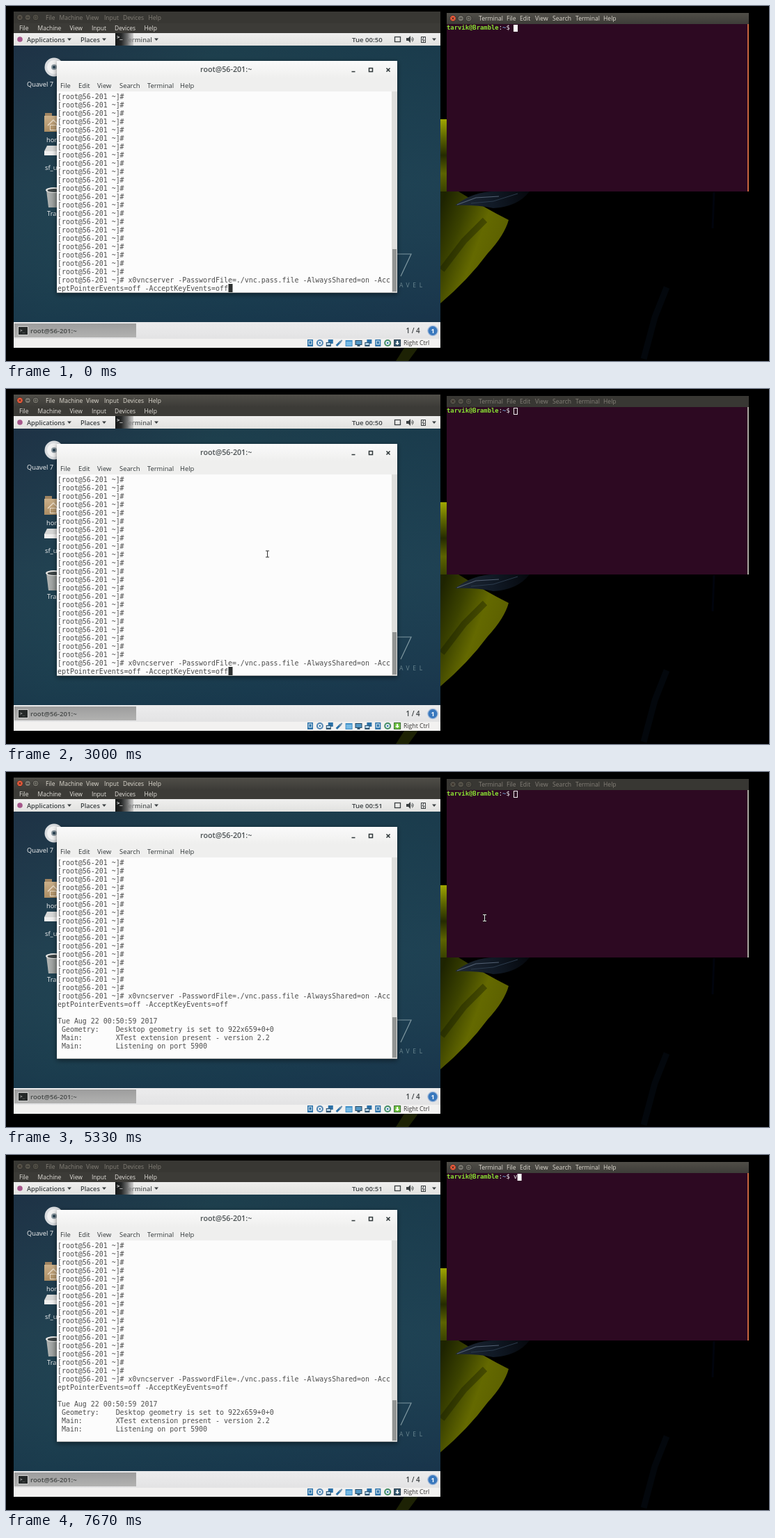
An HTML page with a canvas for the animation above (8000 ms loop, 1096 px wide and 511 px high).

```html
<!DOCTYPE html>
<html lang="en">
<head>
<meta charset="utf-8">
<title>Two terminals</title>
<style>
html, body { margin: 0; width: 100%; height: 100%; overflow: hidden; background: #000; }
canvas { display: block; }
</style>
</head>
<body>
<canvas id="stage" width="1096" height="511"></canvas>
<script>
const ctx = document.getElementById('stage').getContext('2d');
const LOOP = 8000, STEP = 1000 / 3;
const SANS = '"Open Sans", "Noto Sans", sans-serif';
const MONO = '"DejaVu Sans Mono", monospace';
const HOST = 'tarvik@Bramble';

function rect(x, y, w, h, fill) {
  ctx.fillStyle = fill;
  ctx.fillRect(x, y, w, h);
}
function frame(x, y, w, h, color, width = 1) {
  ctx.strokeStyle = color;
  ctx.lineWidth = width;
  ctx.strokeRect(x, y, w, h);
}
function circle(x, y, r, fill) {
  ctx.fillStyle = fill;
  ctx.beginPath();
  ctx.arc(x, y, r, 0, Math.PI * 2);
  ctx.fill();
}
function ring(x, y, r, color) {
  ctx.strokeStyle = color;
  ctx.lineWidth = 0.8;
  ctx.beginPath();
  ctx.arc(x, y, r, 0, Math.PI * 2);
  ctx.stroke();
}
function trace(points) {
  ctx.beginPath();
  points.forEach(([x, y], i) => i ? ctx.lineTo(x, y) : ctx.moveTo(x, y));
}
function poly(points, fill) {
  trace(points);
  ctx.fillStyle = fill;
  ctx.fill();
}
function line(points, color, width = 1) {
  trace(points);
  ctx.strokeStyle = color;
  ctx.lineWidth = width;
  ctx.stroke();
}
function text(str, x, y, size, color, family = SANS, weight = 400) {
  ctx.font = `${weight} ${size}px ${family}`;
  ctx.fillStyle = color;
  ctx.fillText(str, x, y);
}
function words(list, y, size, color) {
  for (const [str, x] of list) text(str, x, y, size, color);
}
function gradient(x0, y0, x1, y1, ...colors) {
  const g = ctx.createLinearGradient(x0, y0, x1, y1);
  colors.forEach((c, i) => g.addColorStop(i / (colors.length - 1), c));
  return g;
}
function triangle(x, y, color) {
  poly([[x - 3, y - 1.5], [x + 3, y - 1.5], [x, y + 2]], color);
}

function backdrop() {
  rect(0, 0, 1096, 511, '#000');
  // Leaf showing beside and below the right terminal
  rect(624, 163, 9, 104, gradient(0, 163, 0, 267, '#a0a600', '#5d6500', '#252b00', '#5d6400', '#3a4200'));
  ctx.fillStyle = gradient(624, 290, 720, 325, '#1e2400', '#3b4200', '#646900', '#5c6000');
  ctx.beginPath();
  ctx.moveTo(624, 267);
  ctx.lineTo(650, 267);
  ctx.quadraticCurveTo(690, 292, 722, 308);
  ctx.quadraticCurveTo(716, 330, 692, 356);
  ctx.quadraticCurveTo(664, 394, 624, 428);
  ctx.fill();
  line([[626, 380], [658, 338], [688, 308]], 'rgba(14,18,0,.35)', 9);
  poly([[560, 511], [572, 492], [592, 492], [578, 511]], '#1d2204');
  ctx.fillStyle = gradient(645, 290, 750, 267, '#202a36', '#111a26', '#05080d');
  ctx.beginPath();
  ctx.moveTo(645, 287);
  ctx.quadraticCurveTo(672, 266, 705, 267);
  ctx.lineTo(752, 267);
  ctx.quadraticCurveTo(735, 289, 700, 291);
  ctx.quadraticCurveTo(675, 286, 645, 287);
  ctx.fill();
  line([[648, 286], [675, 276], [708, 274]], '#536173', 1.2);
  line([[668, 284], [700, 281], [735, 270]], '#2c3b4c');
  line([[949, 405], [932, 448], [916, 508]], 'rgba(5,12,20,.6)', 9);
  line([[1017, 268], [1015, 320]], 'rgba(2,5,18,.7)', 3);
}

function hostButtons(x, y, active) {
  for (let i = 0; i < 3; i++) {
    const cx = x + i * 11.3;
    circle(cx, y, 4.3, i === 0 && active ? '#ec5b3b' : active ? '#77756d' : '#555249');
    ring(cx, y, 4.3, '#292825');
    if (i === 0) {
      line([[cx - 1.6, y - 1.6], [cx + 1.6, y + 1.6]], '#33251f');
      line([[cx + 1.6, y - 1.6], [cx - 1.6, y + 1.6]], '#33251f');
    } else if (i === 1) line([[cx - 2, y], [cx + 2, y]], '#33322e');
    else frame(cx - 1.7, y - 1.5, 3.4, 3, '#33322e', 0.8);
  }
}

function desktopIcons() {
  circle(69, 88, 13.5, '#d9dcdf');
  circle(69, 88, 10, '#f2f2f2');
  circle(69, 88, 4, '#8b98a0');
  circle(69, 88, 2, '#263f50');
  text('Quavel 7', 30, 115.5, 9.3, '#f4f4f4');

  rect(56, 154, 10, 6, '#a08460');
  rect(55, 158, 24, 23, gradient(0, 158, 0, 181, '#cbb08a', '#ab8d63'));
  line([[60, 172], [68, 164], [76, 172]], '#eadcc8', 1.5);
  frame(63.5, 171.5, 9, 7, '#eadcc8');
  text('home', 58, 195.5, 9.3, '#f4f4f4');

  poly([[59, 201], [80, 201], [80, 215], [56, 215], [55, 209]], '#d7d8d7');
  rect(55, 209, 24, 6, '#f0f0ef');
  text('sf_u', 56, 235.5, 9.3, '#f4f4f4');

  poly([[58, 265], [80, 265], [78, 290], [61, 290]], gradient(58, 0, 80, 0, '#b5b8b6', '#777d7b'));
  ctx.fillStyle = '#e6e6e4';
  ctx.beginPath();
  ctx.ellipse(69, 265, 12, 4, 0, 0, Math.PI * 2);
  ctx.fill();
  ctx.fillStyle = '#3c4445';
  ctx.beginPath();
  ctx.ellipse(69, 265.5, 9.5, 2.5, 0, 0, Math.PI * 2);
  ctx.fill();
  text('Trash', 59, 302, 9.3, '#f4f4f4');
}

function topPanel(minute) {
  rect(11, 39, 613, 18, gradient(0, 39, 0, 57, '#efefee', '#e2e2e0'));
  const ink = '#3a3f41';
  circle(20, 48, 3.8, '#a5568a');
  text('Applications', 30, 51.7, 9.2, ink, SANS, 600);
  triangle(91, 48, ink);
  text('Places', 107, 51.7, 9.2, ink, SANS, 600);
  triangle(141, 48, ink);
  text('Terminal', 171, 51.7, 9.2, '#55595a', SANS, 600);
  triangle(216, 48, ink);
  rect(157, 39, 26, 18, gradient(157, 0, 183, 0, '#151818', '#262828', '#6d6e6e', 'rgba(170,170,170,.5)'));
  text('>_', 159, 47, 7, '#f0f0f0', MONO, 700);
  text('Tue 00:' + minute, 497, 51.7, 9.6, ink, SANS, 600);
  frame(558.5, 44.5, 8, 7, ink, 1.3);
  poly([[575, 46], [578, 46], [581, 43], [581, 53], [578, 50], [575, 50]], ink);
  for (const r of [2, 4]) {
    ctx.beginPath();
    ctx.arc(581, 48, r, -1, 1);
    ctx.strokeStyle = ink;
    ctx.lineWidth = 1;
    ctx.stroke();
  }
  frame(596.5, 44.5, 6, 8, ink);
  line([[600, 45], [598, 49], [601, 49], [599, 52]], ink);
  triangle(615, 48, ink);
}

function bottomPanel(active) {
  rect(11, 455, 613, 24, gradient(0, 455, 0, 479, '#ececed', '#e3e3e4'));
  rect(12, 457, 175, 20, gradient(0, 457, 0, 477, '#9d9d9d', '#b2b2b1'));
  rect(17, 461, 15, 13, '#d1d1d0');
  rect(18, 462, 13, 11, '#242828');
  text('>_', 20, 469, 6, '#ddd', MONO);
  text('root@56-201:~', 35, 471, 9.6, '#444746', SANS, 600);
  text('1 / 4', 574.5, 471, 9.8, '#3a3f41', SANS, 600);
  circle(613, 467.5, 7.8, '#a7bddb');
  circle(613, 467.5, 6.5, '#3978bd');
  text('1', 610.5, 471, 9, '#fff', SANS, 700);

  rect(11, 479, 613, 13, '#f2f1f0');
  const blue = '#2b71a8';
  for (let i = 0; i < 10; i++) {
    const x = 437 + i * 13.9, y = 485;
    if (i === 1 || i === 8) {
      circle(x, y, 5, i === 1 ? '#5487b4' : '#438d64');
      circle(x, y, 3, '#e4edf4');
      circle(x, y, 1.2, blue);
    } else if (i === 3) {
      line([[x - 4, y + 4], [x + 2, y - 2]], blue, 3);
      line([[x, y], [x + 4, y - 4]], '#6a8fac', 2);
    } else if (i === 2 || i === 6) {
      rect(x - 2, y - 5, 7, 6, blue);
      rect(x - 5, y - 1, 7, 6, '#274c69');
      rect(x - 4, y, 5, 3, '#b9d7eb');
    } else if (i === 4) {
      rect(x - 5, y - 4, 10, 9, '#408fc7');
      rect(x - 4, y - 2, 8, 6, '#76b9e4');
    } else if (i === 5) {
      rect(x - 5, y - 4, 10, 7, '#244761');
      rect(x - 4, y - 3, 8, 5, '#5497c4');
      rect(x - 2, y + 3, 4, 2, '#355b77');
    } else if (i === 9) {
      rect(x - 5, y - 5, 10, 10, active ? '#386d31' : '#263b4b');
      rect(x - 4, y - 4, 8, 8, active ? '#71c441' : '#385b72');
      rect(x - 1, y - 3, 2, 4, '#fff');
      poly([[x - 3, y], [x + 3, y], [x, y + 3]], '#fff');
    } else {
      rect(x - 4, y - 5, 8, 10, blue);
      frame(x - 2, y - 3, 4, 5, '#e2f0f8');
    }
  }
  text('Right Ctrl', 571, 488.3, 8.7, '#383735');
}

const PROMPT = '[root@56-201 ~]#';
const COMMAND = [
  PROMPT + ' x0vncserver -PasswordFile=./vnc.pass.file -AlwaysShared=on -Acc',
  'eptPointerEvents=off -AcceptKeyEvents=off'
];
const OUTPUT = [
  '',
  'Tue Aug 22 00:50:59 2017',
  ' Geometry:    Desktop geometry is set to 922x659+0+0',
  ' Main:        XTest extension present - version 2.2',
  ' Main:        Listening on port 5900',
  ''
];

function guestTerminal(started, cursorOn) {
  ctx.save();
  ctx.shadowColor = 'rgba(0,0,0,.5)';
  ctx.shadowBlur = 7;
  ctx.shadowOffsetY = 2;
  rect(73, 79, 489, 334, '#ededeb');
  ctx.restore();
  rect(73, 79, 489, 25, gradient(0, 79, 0, 104, '#fafafa', '#efefee'));
  rect(73, 104, 489, 19, '#efefee');
  text('root@56-201:~', 279, 95, 10.7, '#4a5052', SANS, 600);
  line([[496.5, 94.5], [501.5, 94.5]], '#30383a', 1.5);
  frame(521.5, 89.5, 5, 5, '#30383a', 1.5);
  line([[546.5, 89.5], [551.5, 94.5]], '#30383a', 1.6);
  line([[551.5, 89.5], [546.5, 94.5]], '#30383a', 1.6);
  words([['File', 78], ['Edit', 104], ['View', 131], ['Search', 163], ['Terminal', 203], ['Help', 250]],
    118, 9.4, '#303638');

  rect(73, 123, 481, 290, '#fcfcfc');
  rect(554, 123, 8, 290, '#dfdfdd');
  const top = started ? 353 : 350;
  rect(555, top, 6, 411 - top, '#939594');
  rect(73, 412, 489, 1, '#b5b6b5');

  const tail = started ? COMMAND.concat(OUTPUT) : COMMAND;
  const rows = Array(24 - tail.length).fill(PROMPT).concat(tail);
  rows.forEach((row, i) => text(row, 74, 133.7 + i * 12, 9.93, '#4c4c4c', MONO));
  if (cursorOn) rect(started ? 74 : 319.5, 400, 6, 12, '#2d3030');
}

function guestWindow(active, minute, started, cursorOn) {
  rect(11, 8, 613, 31, '#3c3b37');
  rect(11, 8, 613, 17, active ? gradient(0, 8, 0, 25, '#504e48', '#3d3c38') : '#383733');
  hostButtons(20, 16.4, active);
  words([['File', 57], ['Machine', 76.5], ['View', 115], ['Input', 141], ['Devices', 168], ['Help', 204.5]],
    19.8, 8.5, active ? '#dedad0' : '#837f77');
  words([['File', 19], ['Machine', 45.5], ['View', 91.5], ['Input', 123], ['Devices', 156], ['Help', 198.5]],
    35.3, 8.5, '#e5e2dc');

  rect(11, 57, 613, 400, gradient(11, 57, 624, 456, '#21364a', '#204452', '#1d4152', '#1e3c50'));
  rect(11, 57, 613, 400, gradient(0, 57, 0, 456, 'rgba(8,20,35,.12)', 'rgba(40,90,100,.1)', 'rgba(8,30,60,.25)'));
  desktopIcons();
  line([[561, 357], [582, 357], [567, 389]], '#7f98a1', 1.2);
  [...'AVEL'].forEach((c, i) => text(c, 565 + i * 9.6, 405.3, 8.5, '#6b8791'));
  topPanel(minute);
  guestTerminal(started, cursorOn);
  bottomPanel(active);
}

function hostTerminal(active, litScroll, typed) {
  rect(633, 10, 434, 16, active ? gradient(0, 10, 0, 26, '#504e48', '#3d3c38') : '#383733');
  hostButtons(642, 17.8, active);
  words([['Terminal', 679], ['File', 719], ['Edit', 738], ['View', 760], ['Search', 785], ['Terminal', 818], ['Help', 858]],
    21.3, 8.6, active ? '#dedad0' : '#837f77');
  rect(633, 26, 434, 241, '#2d0922');
  rect(1065, 26, 2, 241, litScroll ? '#c7653f' : '#aaa69f');

  const size = 8.87, cell = 5.34, y = 34.3;
  text(HOST, 633, y, size, '#8ae234', MONO, 700);
  text(':', 633 + 14 * cell, y, size, '#eee', MONO);
  text('~', 633 + 15 * cell, y, size, '#739fcf', MONO, 700);
  text('$ ' + typed, 633 + 16 * cell, y, size, '#eee', MONO);
  const x = 729 + typed.length * 5.6;
  if (active) rect(x, 27, 6, 10, '#fff');
  else frame(x + 0.5, 27.5, 5, 9, '#eee');
}

function beam(x, y, color, edge) {
  const shape = [[x - 2.5, y - 4.5], [x + 2.5, y - 4.5]];
  const foot = shape.map(([px, py]) => [px, py + 9]);
  const stem = [[x, y - 4.5], [x, y + 4.5]];
  for (const [c, w] of [[edge, 2.4], [color, 1]]) {
    for (const part of [shape, foot, stem]) line(part, c, w);
  }
}
function arrow(x, y) {
  const shape = [[x, y], [x, y + 10], [x + 2.5, y + 8], [x + 4, y + 11], [x + 5.5, y + 10], [x + 4, y + 7], [x + 7, y + 7], [x, y]];
  poly(shape, '#111');
  line(shape, '#fff', 0.8);
}

function pointer(n) {
  if (n < 2 || n >= 23) return;
  if (n === 2) beam(750.5, 69.5, '#ddd', '#222');
  else if (n === 3) arrow(372.5, 194);
  else if (n === 4) beam(373.5, 199.5, '#333', '#fff');
  else if (n === 5) beam(375.5, 232.5, '#333', '#fff');
  else if (n < 15) beam(375.5, 237.5, '#333', '#fff');
  else if (n === 15) beam(493.5, 228.5, '#333', '#fff');
  else if (n === 16) beam(687.5, 210, '#ddd', '#222');
  else beam(761.5, 135.5, '#ddd', '#222');
}

function draw(t) {
  const n = Math.floor((t + 4) / STEP);
  const guestActive = n >= 6 && n < 17;
  const started = n >= 10;
  const blink = Math.floor((n * STEP - 3800) / 600);
  const cursorOn = !started || blink < 0 || blink % 2 === 1;
  backdrop();
  guestWindow(guestActive, started ? '51' : '50', started, cursorOn);
  hostTerminal(!guestActive, n < 6 || n >= 18, n >= 23 ? 'v' : '');
  pointer(n);
}

function tick() {
  draw(performance.now() % LOOP);
  requestAnimationFrame(tick);
}
tick();
</script>
</body>
</html>
```
